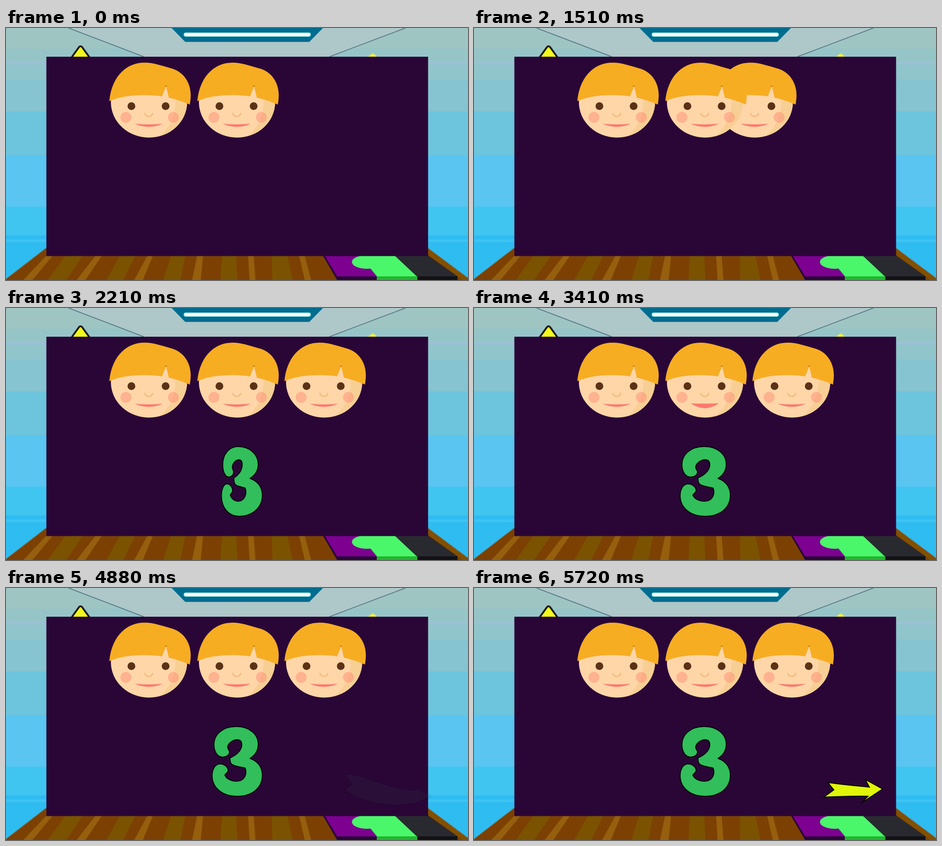
An HTML page for the animation above (6520 ms loop, 1013x553 px).

```html
<!DOCTYPE html>
<html lang="en">
<head>
<meta charset="utf-8">
<title>Counting faces</title>
<style>
html, body { margin: 0; width: 100%; height: 100%; overflow: hidden; background: #2fbcf0; }
svg { display: block; width: 100%; height: 100%; }
</style>
</head>
<body>
<svg viewBox="0 0 1013 553" preserveAspectRatio="none">
  <defs>
    <clipPath id="skinClip"><ellipse cx="313.5" cy="163" rx="83.5" ry="77.5"/></clipPath>
    <g id="head">
      <ellipse cx="313.5" cy="163" rx="83.5" ry="77.5" fill="#ffd6a8"/>
      <path d="M371 140C374 180 368 215 331 241H400V140Z" fill="#f7cf95" clip-path="url(#skinClip)"/>
      <path d="M226.500 160.500C231 111 260 76 304 76C325 76 345 84 364 89C391 97 405 122 405 147C405 155 404 162 403 168C388 162 373 156 357 153L351 128L342 150C308 145 258 146 226.500 160.500Z" fill="#f7ad22"/>
      <path d="M348 127.500H353" stroke="#8a5a1c"/>
      <g fill="#5b3216"><circle cx="275" cy="171.500" r="8.500"/><circle cx="350" cy="171.500" r="8.500"/></g>
      <g fill="#ff8f78" opacity=".5"><circle cx="263" cy="196" r="12"/><circle cx="367" cy="196" r="12"/></g>
      <path d="M304.500 186.500C304.500 196.500 321.500 196.500 321.500 186.500" fill="none" stroke="#f3bd7e" stroke-width="3"/>
    </g>
    <path id="smile" d="M282 210Q313 213 344 210Q313 224 282 210Z" fill="#fb7a70"/>
    <g id="face"><use href="#head"/><use href="#smile"/></g>
  </defs>

  <g id="wall"></g>
  <path d="M137 0L302 63H709L876 0Z" fill="#aec7c8"/>
  <path d="M137 0L302 63M876 0L709 63" stroke="#5b7f8c" stroke-width="2"/>
  <path d="M363 0L393 30.500H665L695 0Z" fill="#006c8f"/>
  <rect x="389.500" y="10" width="279" height="9" rx="4.500" fill="#9ff3ee"/>
  <rect x="391.500" y="11.500" width="275" height="6" rx="3" fill="#fff"/>
  <path d="M142 67L160 42Q163 38 167 42L185 67Z" fill="#f2f91e" stroke="#1c1c1c" stroke-width="4"/>
  <path d="M794 63L801 57Q804 55 807 57L813 63Z" fill="#e9ee3c"/>

  <path d="M0 551L88 483H925L1013 549V553H0Z" fill="#7c4102"/>
  <path d="M925 484L1013 550V553H1000L925 497Z" fill="#835000"/>
  <path d="M0 551L88 483M925 483L1013 549" stroke="#7a6a4c" stroke-width="1.500"/>
  <g id="boards"></g>

  <path d="M695 500L726 553H990V545L926 500Z" fill="#2a0637"/>
  <path d="M699 500H800V545H726Z" fill="#7d0090"/>
  <path d="M800 500H853L901 545H813L799 528Z" fill="#4bf76a"/>
  <path d="M799 528L813 545H798V528Z" fill="#7d0090"/>
  <ellipse cx="791" cy="513.500" rx="32.500" ry="15" fill="#4bf76a"/>
  <path d="M813 545H902V553H813Z" fill="#22b52f"/>
  <path d="M853 500H926L990 545H901Z" fill="#292a2f"/>
  <path d="M902 545H990V553H902Z" fill="#121215"/>

  <rect x="88.500" y="63" width="837" height="437.500" fill="#2a0637"/>
  <use href="#face"/>
  <use id="third" href="#face"/>
  <g transform="translate(193)">
    <use href="#head"/>
    <path id="talk" fill="#fb7a70"/>
  </g>
  <path id="digit" fill="#32be5b" stroke="#050205" stroke-width="2" stroke-linejoin="round"/>
  <path id="arrow" stroke="#050205" stroke-width="2"/>
</svg>
<script>
const LOOP = 6520, STEP = 30;
const $ = id => document.getElementById(id);
const mix = (a, b, k) => a + (b - a) * k;

// Progress 0..1 between two times, held for each step
function progress(t, from, to) {
  const held = Math.floor((t - from) / STEP) * STEP;
  return Math.max(0, Math.min(1, held / (to - from)));
}

// Blend two paths that share the same commands
function mixPath(a, b, k) {
  const ends = b.match(/-?\d+/g);
  let i = 0;
  return a.replace(/-?\d+/g, n => mix(+n, +ends[i++], k).toFixed(2));
}

const bands = [
  [0, "#9fc5c3"], [45, "#96c5c8"], [73, "#9bc1d4"], [80, "#90c5cc"],
  [113, "#85c4d0"], [183, "#6cc5dc"], [279, "#59c5f0"], [392, "#40c5f1"],
  [455, "#2fbcf2"], [464, "#3fc3f2"], [470, "#2fbcf0"]
];
$("wall").innerHTML = bands.map(([y, c]) =>
  `<rect y="${y}" width="1013" height="${553 - y}" fill="${c}"/>`).join("");

// Each board: left and right at the top edge, then at the bottom edge
const olive = [[130, 168, 92, 132], [250, 283, 220, 257], [362, 393, 345, 382], [474, 505, 470, 507], [583, 617, 584, 628]];
const light = [[88, 102, 38, 58], [196, 210, 155, 174], [310, 322, 281, 300], [419, 432, 408, 427], [531, 543, 534, 547], [643, 655, 655, 669]];
const board = c => ([a, b, d, e]) =>
  `<path d="M${a} 500H${b}L${e} 553H${d}Z" fill="${c}"/>`;
$("boards").innerHTML = olive.map(board("#7b5300")).join("") + light.map(board("#955f0d")).join("");

const three = "M504 304C533 304 553 320 553 343C553 358 546 367 535 374" +
  "C552 380 562 393 562 411C562 439 539 457 507 457C474 457 452 438 452 412" +
  "C452 396 460 386 469 386C479 386 487 393 487 401C487 406 480 407 480 411" +
  "C483 418 493 424 505 424C519 424 526 415 526 403C526 399 525 397 524 395" +
  "C514 392 500 392 494 386C491 382 491 377 491 373C506 366 517 357 517 344" +
  "C517 337 514 333 507 333C496 333 486 342 486 350C486 354 490 355 490 360" +
  "C490 366 483 371 475 371C463 371 456 358 456 344C456 320 477 304 504 304Z";

// The left half of the digit unfolds away from a vertical axis
function unfold(k) {
  const axis = 520, scale = mix(0.5, 1, k);
  return three.replace(/(\d+) (\d+)/g, (m, x, y) =>
    (x < axis ? axis - (axis - x) * scale : x) + " " + y);
}

const swoosh = "M744 409C790 408 822 439 898 444L893 435L932 456L880 481L892 473C840 482 785 472 744 444L758 430Z";
const pointer = "M776 427C806 431 836 434 867 437L858 420L896 441L849 472L864 457C832 456 800 458 767 459L789 443Z";
const green = [50, 192, 92], yellow = [224, 245, 10];

function draw(t) {
  const slide = progress(t, 1030, 1870);
  $("third").setAttribute("visibility", t >= 1030 ? "visible" : "hidden");
  $("third").setAttribute("transform", `translate(${193 + 191 * slide})`);

  const open = 1 - Math.abs(progress(t, 3110, 3890) * 2 - 1);
  const lip = 210 - 1.3 * open;
  $("talk").setAttribute("d",
    `M282 ${lip}Q313 ${mix(213, 210, open)} 344 ${lip}Q313 ${mix(224, 233, open)} 282 ${lip}Z`);

  $("digit").setAttribute("visibility", t >= 2030 ? "visible" : "hidden");
  $("digit").setAttribute("d", unfold(progress(t, 2030, 2480)));

  const k = progress(t, 4880, 5720);
  const tint = green.map((c, i) => Math.round(mix(c, yellow[i], k)));
  $("arrow").setAttribute("d", mixPath(swoosh, pointer, k));
  $("arrow").setAttribute("fill", `rgb(${tint})`);
  $("arrow").setAttribute("opacity", t >= 4880 ? mix(0.05, 1, k) : 0);
}

const start = performance.now();
function tick() {
  draw((performance.now() - start) % LOOP);
  requestAnimationFrame(tick);
}
tick();
</script>
</body>
</html>
```
